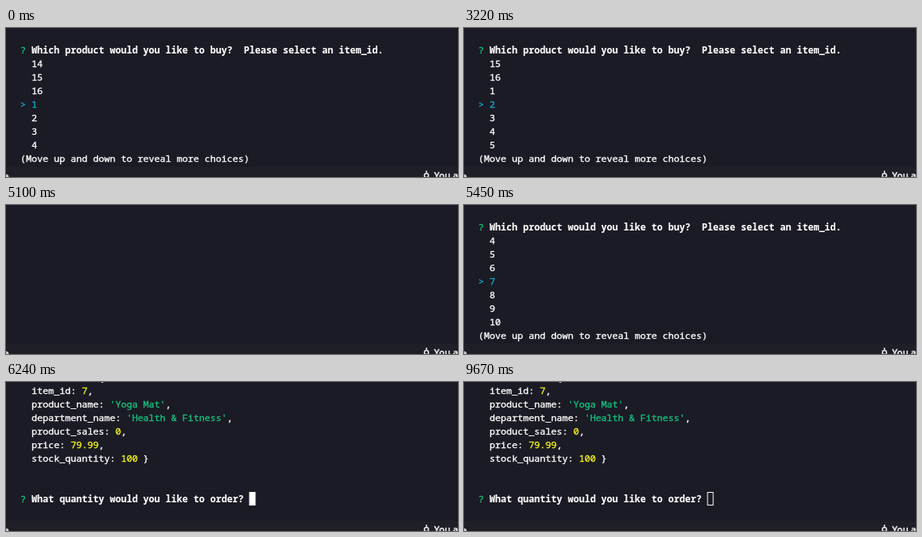
Animation, 566 px wide and 187 px high, one loop 9770 ms. Source, as an HTML page:

```html
<!DOCTYPE html>
<html lang="en">
<head>
<meta charset="utf-8">
<title>Terminal shop prompt</title>
<style>
html, body { margin: 0; width: 100%; height: 100%; overflow: hidden; background: #1b1b25; }
svg { display: block; }
text {
  white-space: pre; color: #fff; fill: currentColor; stroke: currentColor; stroke-width: .35px;
  font: 11.6667px "Noto Sans Mono", "DejaVu Sans Mono", monospace;
}
.b { font-weight: 700; stroke-width: .1px; }
.g { color: #14c17e; }
.c { color: #11a8cd; }
.y { color: #f2f21c; }
#bar text { font: 600 11.5px "Open Sans", sans-serif; color: #ececf0; }
</style>
</head>
<body>
<svg width="566" height="187" viewBox="0 0 566 187">
  <g id="screen"></g>
  <rect id="cursor" width="7" height="16" x="305" y="138.5" stroke="#fff"/>
  <g id="bar">
    <rect y="174" width="566" height="13" fill="#1f1f28"/>
    <text x="-3" y="190">e</text>
    <path d="M526.5 179v3.5M526.5 187.5v3" stroke="#ececf0" stroke-width="1.5"/>
    <circle cx="526.5" cy="185" r="2.6" fill="none" stroke="#ececf0" stroke-width="1.5"/>
    <text x="536" y="189">You a</text>
  </g>
  <path id="mouse" d="M-3 -7.5h2.5M.5 -7.5h2.5M0 -7v14M-3 7.5h2.5M.5 7.5h2.5" stroke="#e8e8e8" fill="none"/>
</svg>
<script>
const LOOP = 9770, ITEMS = 16;
const $ = id => document.getElementById(id);
const span = (cls, s) => `<tspan class="${cls}">${s}</tspan>`;
const row = (n, s) => `<text x="18" y="${15 + 17 * n}">${s}</text>`;
const ask = s => span('g', '?') + span('b', ' ' + s);
const title = row(1, ask('Which product would you like to buy?  Please select an item_id.'));

// [start time, selected item]
const picks = [[0, 1], [3220, 2], [3390, 3], [3600, 4], [3850, 5], [4270, 4],
  [4480, 3], [4930, 4], [5100, 5], [5300, 6], [5450, 7]];

function menu(sel) {
  let out = title;
  for (let i = -3; i <= 3; i++) {
    const id = (sel + i - 1 + ITEMS) % ITEMS + 1;
    out += row(i + 5, i ? '  ' + id : span('c', '&gt; ' + id));
  }
  return out + row(9, '(Move up and down to reveal more choices)');
}

const chosen = title.replace('</text>', span('c', ' 7') + '</text>');
const order = [
  `item_id: ${span('y', 7)},`,
  `product_name: ${span('g', "'Yoga Mat'")},`,
  `department_name: ${span('g', "'Health &amp; Fitness'")},`,
  `product_sales: ${span('y', 0)},`,
  `price: ${span('y', 79.99)},`,
  `stock_quantity: ${span('y', 100)} }`
].map((s, i) => row(i, '  ' + s)).join('') +
  row(-0.95, 'RowDataPacket {') + row(8, ask('What quantity would you like to order?'));

function content(t) {
  if (t >= 6240) return order;
  if (t >= 6190) return chosen;
  if (t >= 5100 && t < 5140) return '';
  return menu(picks.findLast(p => p[0] <= t)[1]);
}

// Brief passes of the mouse pointer, moving in 30 ms steps
function mouseAt(t) {
  const step = (from, to) => (Math.floor((t - from) / 30) * 30 + 15) / (to - from);
  if (t >= 2030 && t < 2120) {
    const k = step(2030, 2120);
    return [566 - 52 * k, 117 + 70 * k];
  }
  if (t >= 7320 && t < 7600) {
    const k = step(7320, 7600);
    return [490 + 67 * k, 190 - 77 * Math.sin(Math.PI * Math.min(k, 1))];
  }
}

let shown = null;
function draw(now) {
  const t = now % LOOP, s = content(t), m = mouseAt(t);
  if (s !== shown) $('screen').innerHTML = shown = s;
  $('cursor').style.display = s === order ? '' : 'none';
  $('cursor').setAttribute('fill', t < 9640 ? '#fff' : 'none');
  $('mouse').style.display = m ? '' : 'none';
  if (m) $('mouse').setAttribute('transform', `translate(${m.map(Math.round)})`);
}

const start = performance.now();
function tick() {
  draw(performance.now() - start);
  requestAnimationFrame(tick);
}
tick();
</script>
</body>
</html>
```
